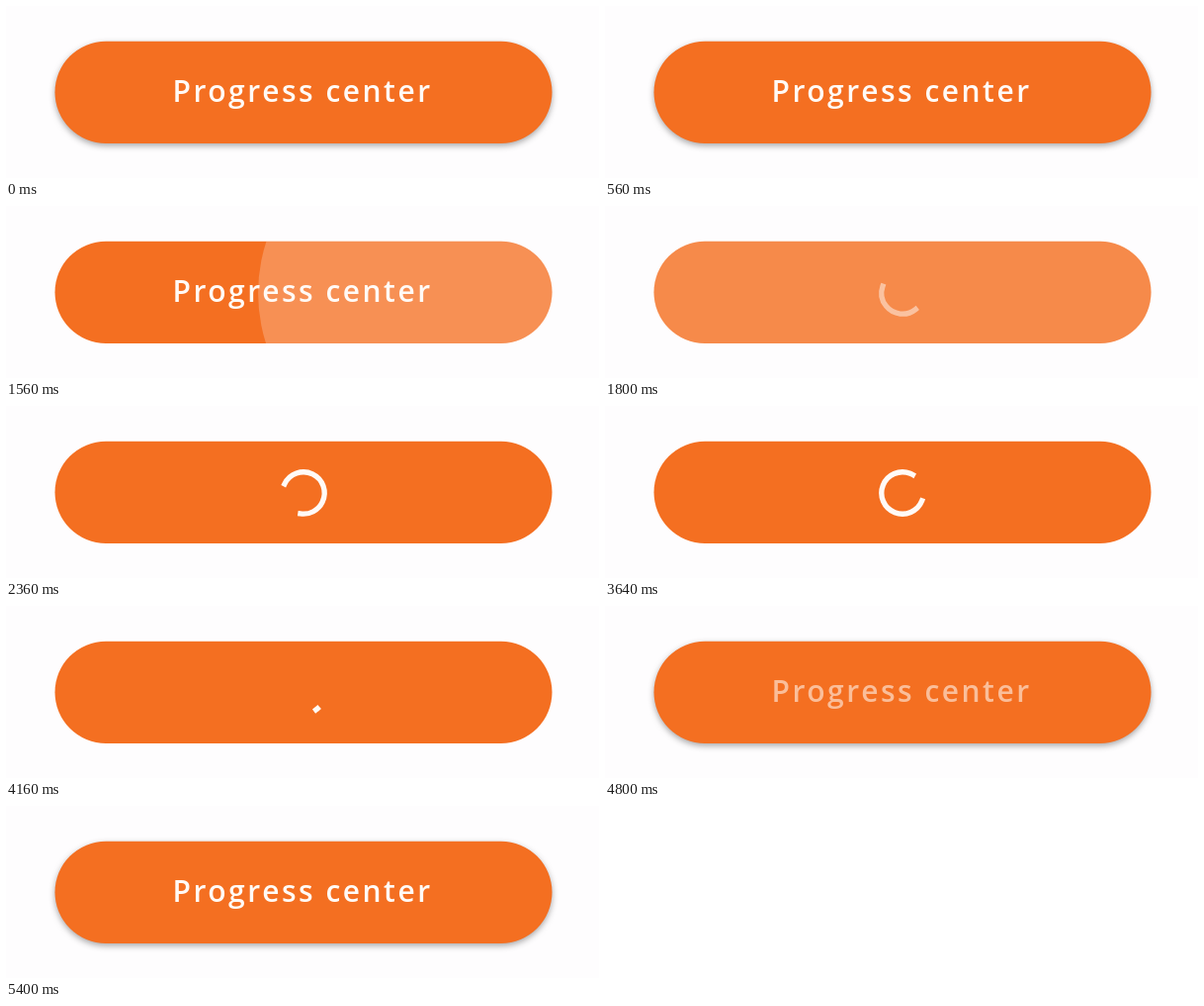
Animation of 600 by 174 pixels, one loop 5480 ms. Source, as an HTML page with a canvas:

```html
<!DOCTYPE html>
<html lang="en">
<head>
<meta charset="utf-8">
<title>Progress button</title>
<style>
  html, body { margin: 0; width: 100%; height: 100%; overflow: hidden; background: #fefdfe; }
  canvas { display: block; width: 600px; height: 174px; }
</style>
</head>
<body>
<canvas id="stage" width="600" height="174"></canvas>
<script>
const ctx = document.getElementById('stage').getContext('2d');
const LOOP = 5480;
const TAU = Math.PI * 2;
const ORANGE = '#f46f21';
const button = { x: 49.5, y: 35.7, w: 503, h: 103.3 };
const center = { x: 301, y: 88 };

const SPIN_START = 1566;
const SPIN_CYCLE = 1332;
const FADE = 150;
const SHOW = 1575;
const HIDE = 4566;
const RIPPLE = { start: 1512, grow: 225, exit: 1770, x: 447, from: 150, to: 256, alpha: 0.23 };

const clamp = v => Math.min(1, Math.max(0, v));
const ramp = (t, start, length) => clamp((t - start) / length);
const mix = (a, b, k) => a + (b - a) * k;

// cubic-bezier(0.4, 0, 0.2, 1), solved by bisection
function fastOutSlowIn(x) {
  let lo = 0, hi = 1;
  for (let i = 0; i < 24; i++) {
    const s = (lo + hi) / 2, r = 1 - s;
    if (1.2 * r * r * s + 0.6 * r * s * s + s * s * s < x) lo = s;
    else hi = s;
  }
  return lo * lo * (3 - 2 * lo);
}

function pill() {
  ctx.beginPath();
  ctx.roundRect(button.x, button.y, button.w, button.h, button.h / 2);
}

function drawButton(t) {
  const lift = 1 - ramp(t, 1450, 100) + ramp(t, HIDE, 100);
  ctx.save();
  if (lift > 0) {
    ctx.shadowColor = `rgba(0, 0, 0, ${0.34 * lift})`;
    ctx.shadowBlur = 6;
    ctx.shadowOffsetY = 2.5;
  }
  ctx.fillStyle = ORANGE;
  pill();
  ctx.fill();
  ctx.restore();
}

function drawRipple(t) {
  const alpha = RIPPLE.alpha * ramp(t, RIPPLE.start, 45) * (1 - ramp(t, RIPPLE.exit, FADE));
  if (alpha <= 0) return;
  const k = fastOutSlowIn(ramp(t, RIPPLE.start, RIPPLE.grow));
  ctx.save();
  pill();
  ctx.clip();
  ctx.fillStyle = `rgba(255, 255, 255, ${alpha})`;
  ctx.beginPath();
  ctx.arc(mix(RIPPLE.x, center.x, k), center.y, mix(RIPPLE.from, RIPPLE.to, k), 0, TAU);
  ctx.fill();
  ctx.restore();
}

function drawLabel(alpha) {
  if (alpha <= 0) return;
  ctx.globalAlpha = alpha;
  ctx.fillStyle = '#fffaf6';
  ctx.font = '600 30px "Open Sans", "Noto Sans", sans-serif';
  ctx.letterSpacing = '2.5px';
  ctx.textBaseline = 'alphabetic';
  ctx.fillText('Progress center', 168.5, 97);
  ctx.globalAlpha = 1;
}

function drawSpinner(t, alpha) {
  if (alpha <= 0) return;
  const turns = Math.max(0, t - SPIN_START) / SPIN_CYCLE;
  const cycle = Math.floor(turns), k = turns - cycle;
  // The head grows in the first half of a cycle, the tail catches up in the second
  let tail = 0, head = 0.79;
  if (k < 0.5) head = 0.01 + 0.79 * fastOutSlowIn(k * 2);
  else tail = head - 0.01 - 0.79 * (1 - fastOutSlowIn(k * 2 - 1));
  const base = cycle * 0.78 + turns * 0.81;
  ctx.globalAlpha = alpha;
  ctx.strokeStyle = '#fffaf6';
  ctx.lineWidth = 5.3;
  ctx.lineCap = 'square';
  ctx.beginPath();
  ctx.arc(center.x, center.y, 21.2, (base + tail) * TAU, (base + head) * TAU);
  ctx.stroke();
  ctx.globalAlpha = 1;
}

function draw(t) {
  ctx.fillStyle = '#fefdfe';
  ctx.fillRect(0, 0, 600, 174);
  drawButton(t);
  drawRipple(t);
  drawLabel(1 - ramp(t, SHOW, FADE) + ramp(t, HIDE + FADE, FADE));
  drawSpinner(t, ramp(t, SHOW + FADE, FADE) - ramp(t, HIDE, FADE));
}

const origin = performance.now();
function tick() {
  draw((performance.now() - origin) % LOOP);
  requestAnimationFrame(tick);
}
tick();
</script>
</body>
</html>
```
